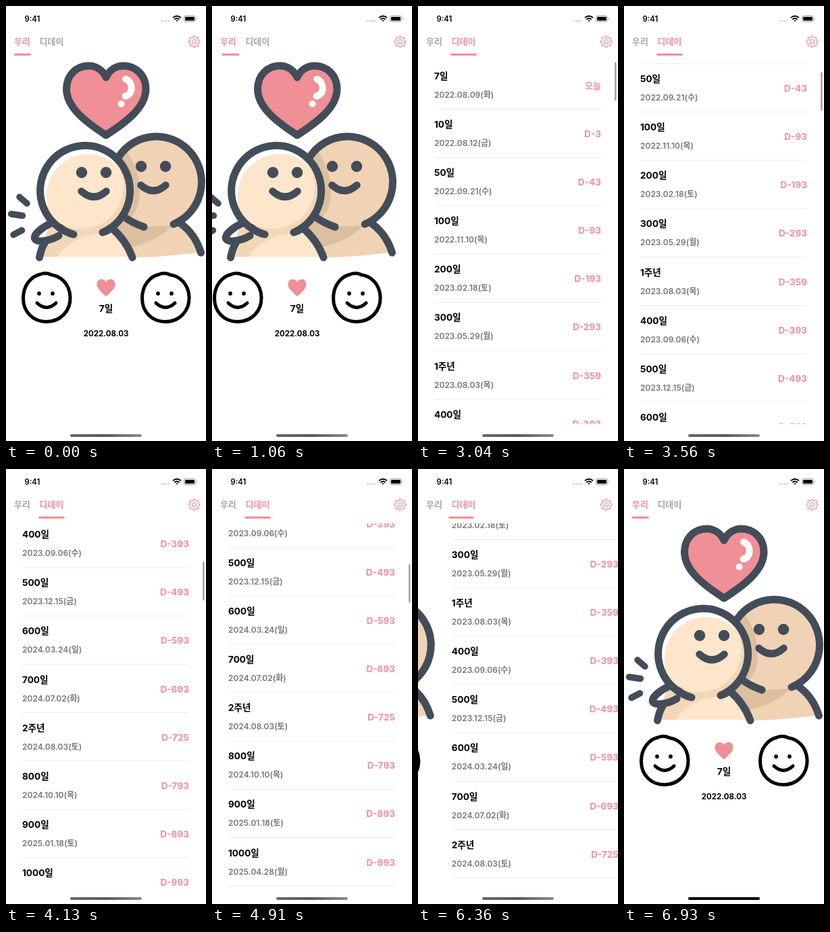
Animation of 296 by 640 pixels, one loop 7.05 s. Source, as an HTML page:

```html
<!DOCTYPE html>
<html lang="ko">
<head>
<meta charset="utf-8">
<style>
  html, body { margin: 0; width: 100%; height: 100%; overflow: hidden; background: #fff; }
  svg { display: block; width: 296px; height: 640px; }
  text { font: 700 13.6px Inter, "Noto Sans CJK KR", "Noto Sans CJK", sans-serif; }
  .tab { font-size: 13px; }
  .date { font-size: 12px; font-weight: 600; fill: #777; }
  .left { text-anchor: end; fill: #f0919a; }
  .mid { text-anchor: middle; }
  .ink { fill: none; stroke: #434c59; stroke-width: 11; stroke-linecap: round; stroke-linejoin: round; }
  .pen { fill: none; stroke: #000; stroke-width: 5; stroke-linecap: round; }
</style>
</head>
<body>
<svg viewBox="0 0 296 640">
  <defs>
    <clipPath id="view"><rect y="80" width="296" height="535"/></clipPath>
    <clipPath id="head"><circle cx="116" cy="272" r="66"/></clipPath>
    <clipPath id="skin"><circle cx="122" cy="280" r="62"/></clipPath>
    <clipPath id="partner"><circle cx="221" cy="261" r="66"/></clipPath>
    <linearGradient id="bar"><stop stop-color="#666"/><stop offset=".5" stop-color="#5a5a5a"/><stop offset="1" stop-color="#8a8a8a"/></linearGradient>
    <g id="smile" class="pen">
      <path d="M50 395C37 398 25.500 411 25.500 430C25.500 450 40 464.500 60 464.500C80 464.500 96 449 95 428C94 408 80 397 67 395.500C62 393 55 393 50 395"/>
      <path d="M46 437Q60 450 74 437"/>
      <path d="M49 423h.01M69 423h.01" stroke-width="5.800"/>
    </g>
    <g id="face" class="ink">
      <path d="M112 245h.01M148 245h.01" stroke-width="16.500"/>
      <path d="M111.500 272.500Q130 289 148.500 272.500" stroke-width="10.500"/>
    </g>
  </defs>

  <text x="27.500" y="23" style="font-size:11.300px;font-weight:600">9:41</text>
  <path d="M230.500 22h.01M234 22h.01M237.500 22h.01M241 22h.01" stroke="#b5b5b5" stroke-width="2" stroke-linecap="round"/>
  <g fill="none" stroke="#000" stroke-width="1.900">
    <path d="M247 17.300Q253 12.300 259 17.300M249.300 19.800Q253 16.800 256.700 19.800"/>
    <path d="M251.300 21.300Q253 20 254.700 21.300L253 23Z" fill="#000" stroke="none"/>
  </g>
  <rect x="263.500" y="14.500" width="17" height="8.600" rx="2.600" fill="none" stroke="#999"/>
  <rect x="265" y="16" width="14" height="5.600" rx="1.300"/>
  <path d="M282 17.300Q284 18.800 282 20.300Z" fill="#999"/>

  <text class="tab" id="us" x="12" y="57.300">우리</text>
  <text class="tab" id="days" x="49.500" y="57.300">디데이</text>
  <rect id="line" y="69.800" height="3.200" fill="#f0919a"/>
  <g fill="none" stroke="#f0919a" stroke-width="1.200" stroke-linejoin="round">
    <path id="gear"/><circle cx="278.500" cy="52.500" r="3"/>
  </g>

  <g id="home">
    <!-- right person -->
    <path d="M160 322L185 300L257 319Q280 335 288 362Q240 369 190 370Z" fill="#f0d3b4"/>
    <circle cx="221" cy="261" r="67" fill="#f0d3b4"/>
    <path d="M150 205H172Q205 245 196 292Q190 312 172 316L150 300Z" fill="#dcbf9f" clip-path="url(#partner)"/>
    <path d="M158 324L175 311L205 325L246 323Q225 346 180 356Z" fill="#dcbf9f"/>
    <path class="ink" d="M168 220A67 67 0 1 1 248 321M257 319Q280 335 288.500 363M172 308Q186 319 204 325"/>
    <use href="#face" x="88" y="-9"/>
    <!-- left person -->
    <path d="M50 369Q54 346 66 320L100 336L143 332L156 326Q178 345 187 369Z" fill="#f3d6b5"/>
    <path d="M76 369Q92 342 143 332L156 326Q178 345 187 369Z" fill="#fde6cb"/>
    <circle cx="116" cy="272" r="66" fill="#fff"/>
    <g clip-path="url(#head)">
      <circle cx="122" cy="280" r="62" fill="#f3d6b5"/>
      <circle cx="112" cy="266" r="62" fill="#fde6cb" clip-path="url(#skin)"/>
    </g>
    <path class="ink" d="M100 336A66.500 66.500 0 1 1 143 333Q152 330 156 326Q178 345 187 370M100 336Q88 333 80 326M66 320C54 325 39 337 43 343C47 349 66 345 78 338M57 349Q52 357 49.500 370"/>
    <use href="#face"/>
    <path class="ink" style="stroke-width:9.500px" d="M20 281L31 290.500M7.500 306L24.500 308.500M11 336.500L23.500 330"/>
    <!-- big heart -->
    <path class="ink" style="fill:#f08f95" d="M148 190C120 172 89.500 150 89.500 122C89.500 102 104 88 122 88C133 88 143 94 148 105C153 94 163 88 174 88C192 88 207 102 207 122C207 150 176 172 148 190Z"/>
    <path d="M177 107.500C189 112 188.500 130 176.500 132.500M170.500 144h.01" fill="none" stroke="#fff" stroke-width="10" stroke-linecap="round"/>
    <!-- couple -->
    <use href="#smile"/><use href="#smile" x="176"/>
    <path d="M148 427.500C143 422 134.500 417 134.500 409.500C134.500 401 144.500 399.500 148 406C151.500 399.500 161.500 401 161.500 409.500C161.500 417 153 422 148 427.500Z" fill="#f08f95"/>
    <text class="mid" x="148" y="450">7일</text>
    <text class="mid" x="148" y="486" style="font-size:11.500px">2022.08.03</text>
  </g>

  <g id="page" clip-path="url(#view)">
    <g id="list"></g>
    <rect id="thumb" x="291" y="82.500" width="2.600" rx="1.300" fill="#a4a4a4"/>
  </g>
  <rect id="grip" x="95" y="630" width="106" height="4" rx="2"/>
</svg>
<script>
const $ = id => document.getElementById(id);
const LOOP = 7050, WIDTH = 296, PITCH = 71.15, DAY = 864e5;

$('gear').setAttribute('d', 'M' + Array.from({length: 32}, (_, i) => {
  const r = i % 4 < 2 ? 8.4 : 6.4, a = (Math.floor(i / 2) + (i % 2 ? .27 : -.27)) * Math.PI / 8;
  return [278.5 + r * Math.cos(a), 52.5 + r * Math.sin(a)].map(v => v.toFixed(2));
}).join('L') + 'Z');

// Milestones: day counts start at 1, anniversaries fall on the calendar date.
const start = Date.UTC(2022, 7, 3);
const marks = [7, 10, 50];
for (let n = 100; n <= 1800; n += 100) marks.push(n);
const rows = marks.map(n => ({name: n + '일', after: n - 1}));
for (let y = 1; y < 5; y++)
  rows.push({name: y + '주년', after: (Date.UTC(2022 + y, 7, 3) - start) / DAY});
rows.sort((a, b) => a.after - b.after);

$('list').innerHTML = rows.map(({name, after}, i) => {
  const d = new Date(start + after * DAY), y = 108 + i * PITCH, left = after - 6;
  const date = d.toISOString().slice(0, 10).replace(/-/g, '.') + `(${'일월화수목금토'[d.getUTCDay()]})`;
  return `<text x="24" y="${y}">${name}</text>
    <text class="date" x="24" y="${y + 27}">${date}</text>
    <text class="left" x="271" y="${y + 14}" ${left ? '' : 'style="font-size:13px"'}>${left ? 'D-' + left : '오늘'}</text>
    <path d="M24 ${y + 44}H271" stroke="#ebebeb"/>`;
}).join('');

// The screen refreshes in coarse steps: [first, last, count].
const ticks = [[0, 0, 1], [1060, 1750, 7], [1870, 1870, 1], [2270, 2940, 7], [3040, 3680, 7],
  [3790, 4130, 4], [4250, 4460, 3], [4590, 5240, 7], [5340, 5670, 4], [5790, 5910, 2],
  [6130, 6130, 1], [6360, 6930, 6]]
  .flatMap(([a, b, n]) => Array.from({length: n}, (_, i) => n > 1 ? a + (b - a) * i / (n - 1) : a));

const ramp = (t, a, b) => Math.min(1, Math.max(0, (t - a) / (b - a)));
const ease = (t, a, b) => { const x = ramp(t, a, b); return x * x * (3 - 2 * x); };
const mix = (a, b, k) => a + (b - a) * k;
const tint = k => `rgb(${[[166, 240], [166, 145], [166, 154]].map(([a, b]) => Math.round(mix(a, b, k)))})`;

const scrollAt = t => -40 * (ease(t, 2200, 2660) - ease(t, 2660, 3020))
  + 561 * ease(t, 3020, 4400) - 228 * ease(t, 4560, 5720);

function draw(t) {
  const p = ease(t, 940, 1660) - ease(t, 6240, 6900);
  const active = ramp(t, 1450, 1870) - ramp(t, 6480, 6880);
  const s = scrollAt(t);
  const x0 = mix(12, 48.5, p);
  $('home').setAttribute('transform', `translate(${-WIDTH * p})`);
  $('page').setAttribute('transform', `translate(${WIDTH * (1 - p)})`);
  $('list').setAttribute('transform', `translate(0 ${-s})`);
  $('line').setAttribute('x', x0);
  $('line').setAttribute('width', mix(36.5, 86.5, p) - x0);
  $('us').setAttribute('fill', tint(1 - active));
  $('days').setAttribute('fill', tint(active));
  $('thumb').setAttribute('y', 82.5 + Math.max(0, s) * .107);
  $('thumb').setAttribute('height', 57 + Math.min(0, s));
  $('thumb').setAttribute('opacity', t < 2270 ? 0 : 1 - ramp(t, 5950, 6300));
  $('grip').setAttribute('fill', t >= 6930 ? '#000' : 'url(#bar)');
}

const begin = performance.now();
function frame() {
  const now = (performance.now() - begin) % LOOP;
  draw(ticks.findLast(t => t <= now) ?? 0);
  requestAnimationFrame(frame);
}
frame();
</script>
</body>
</html>
```
